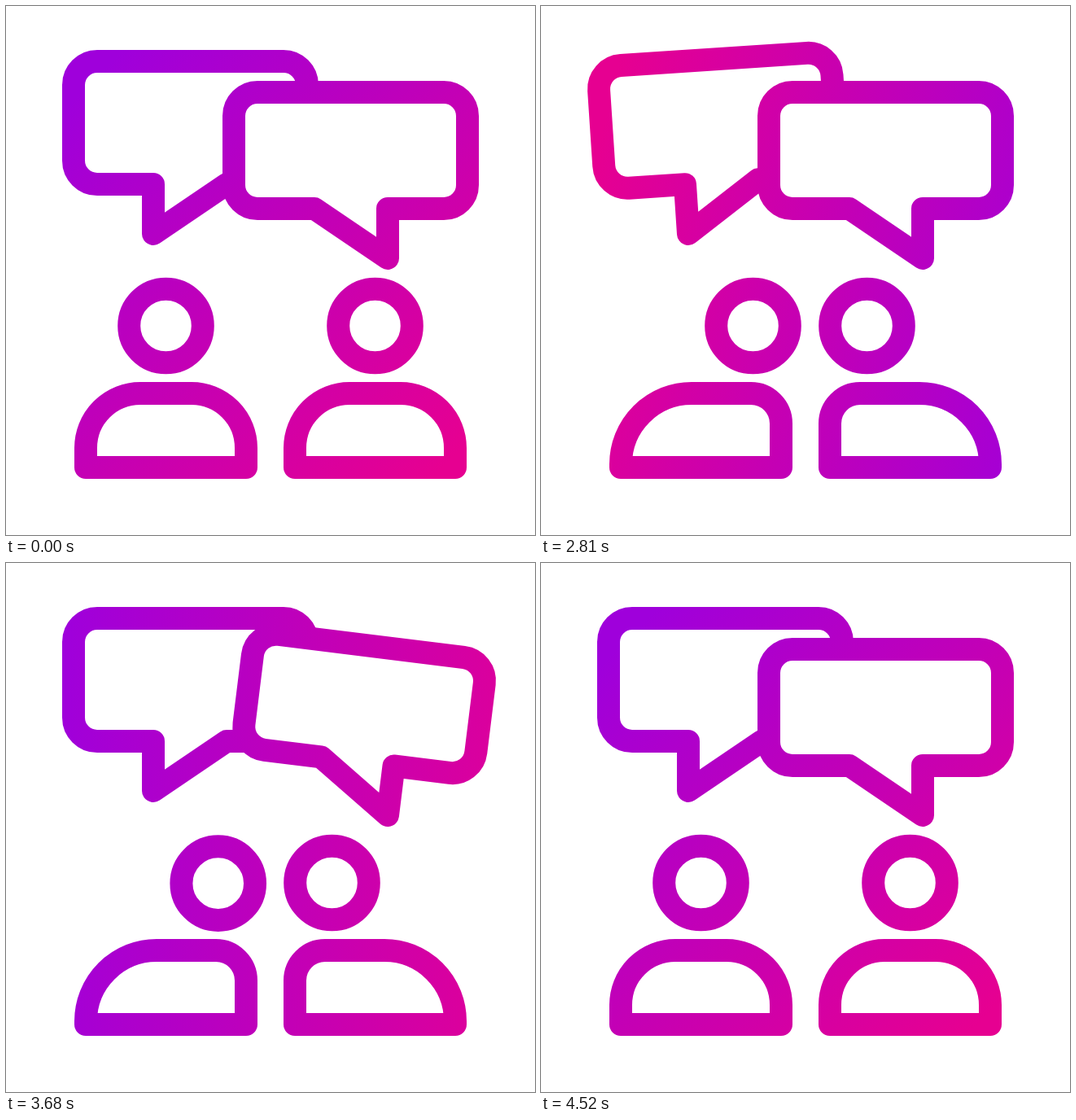
An HTML page with a canvas for the animation above (4.55 s loop, 650 by 650 pixels).

```html
<!DOCTYPE html>
<html lang="en">
<head>
<meta charset="utf-8">
<title>Conversation</title>
<style>
  html, body { margin: 0; width: 100%; height: 100%; overflow: hidden; background: #fff; }
  canvas { display: block; }
</style>
</head>
<body>
<canvas id="stage" width="650" height="650"></canvas>
<script>
const ctx = document.getElementById('stage').getContext('2d');
const LOOP = 4550, START = 2000, STEP = 30, END = 4520;

const clamp = x => Math.min(1, Math.max(0, x));
const ease = x => (1 - Math.cos(Math.PI * clamp(x))) / 2;

// Eased interpolation through [time, value] pairs.
const keys = (t, list) => list.slice(1).reduce(
  (v, [time, value], i) => v + (value - list[i][1]) * ease((t - list[i][0]) / (time - list[i][0])),
  list[0][1]);

// Damped swing in degrees, counter-clockwise positive.
const swing = (t, start) =>
  keys(t, [0, 20.5, -14.4, 8.5, -4.2, 0].map((v, i) => [start + 240 * i, v]));

// Squash, then stretch, then settle.
const squash = (t, start) =>
  keys(t, [[start, 0], [start + 135, 0.044], [start + 300, -0.02], [start + 450, 0]]);

const turn = (t, start) => ease((t - start) / 300);
const nod = (t, start) => keys(t, [[start, 0], [start + 225, 1], [start + 450, 0]]);

// Draws in a frame placed at x, y; side -1 mirrors it.
function at(x, y, side, angle, draw) {
  ctx.save();
  ctx.translate(x, y);
  ctx.rotate(-angle * Math.PI / 180);
  ctx.scale(side, 1);
  draw();
  ctx.restore();
}

// Speech bubble with its origin at the tip of the tail.
function bubble(x, y, side, top, angle) {
  at(x, y, side, angle, () => {
    const left = -98, right = 189, bottom = -61, r = 29;
    ctx.beginPath();
    ctx.moveTo(0, 0);
    ctx.lineTo(0, bottom);
    ctx.arcTo(left, bottom, left, top, r);
    ctx.arcTo(left, top, right, top, r);
    ctx.arcTo(right, top, right, bottom, r);
    ctx.arcTo(right, bottom, 90, bottom, r);
    ctx.lineTo(90, bottom);
    ctx.closePath();
    ctx.globalCompositeOperation = 'destination-out';
    ctx.fill();
    ctx.globalCompositeOperation = 'source-over';
    ctx.stroke();
  });
}

// Person with the origin at the middle of the base.
function person(t, x, side, travel, out, back, dip) {
  const p = turn(t, out) - turn(t, back);
  const k = squash(t, out) + squash(t, back);
  at(x, 581, side, 0, () => {
    const w = 98.5, top = -105, base = -14;
    ctx.scale(1 + k, 1 - k);
    ctx.beginPath();
    ctx.arc(travel * p + 5 * dip, -188 + 15 * dip, 45.3, 0, 2 * Math.PI);
    ctx.closePath();
    ctx.moveTo(-w, base);
    ctx.arcTo(-w, top, 0, top, 67 + 20 * p);
    ctx.arcTo(w, top, w, base, 67 - 30 * p);
    ctx.lineTo(w, base);
    ctx.closePath();
    ctx.stroke();
  });
}

// Colours everything drawn so far with a turning gradient.
function tint(t) {
  const x = clamp((t - START) / (END - START));
  const angle = Math.PI / 4 + 2 * Math.PI * (1 - (1 - x ** 1.6) ** 3);
  const dx = 320 * Math.cos(angle), dy = 320 * Math.sin(angle);
  const g = ctx.createLinearGradient(375 - dx, 275 - dy, 375 + dx, 275 + dy);
  g.addColorStop(0, '#9f00db');
  g.addColorStop(1, '#e60091');
  ctx.globalCompositeOperation = 'source-in';
  ctx.fillStyle = g;
  ctx.fillRect(0, 0, 650, 650);
  ctx.globalCompositeOperation = 'source-over';
}

function render() {
  const now = performance.now() % LOOP;
  const t = now < START + STEP ? 0 : START + STEP * Math.floor((now - START) / STEP);
  ctx.clearRect(0, 0, 650, 650);
  ctx.fillStyle = ctx.strokeStyle = '#000';
  ctx.lineWidth = 28;
  ctx.lineJoin = 'round';
  bubble(181, 280, 1, -212, swing(t, 1990));
  bubble(469, 310, -1, -204, swing(t, 3108));
  person(t, 196.5, 1, 64, 1988, 4025, nod(t, 2810) + nod(t, 3260));
  person(t, 453.5, -1, 53, 2063, 3842, nod(t, 3690));
  tint(t);
  requestAnimationFrame(render);
}
render();
</script>
</body>
</html>
```
